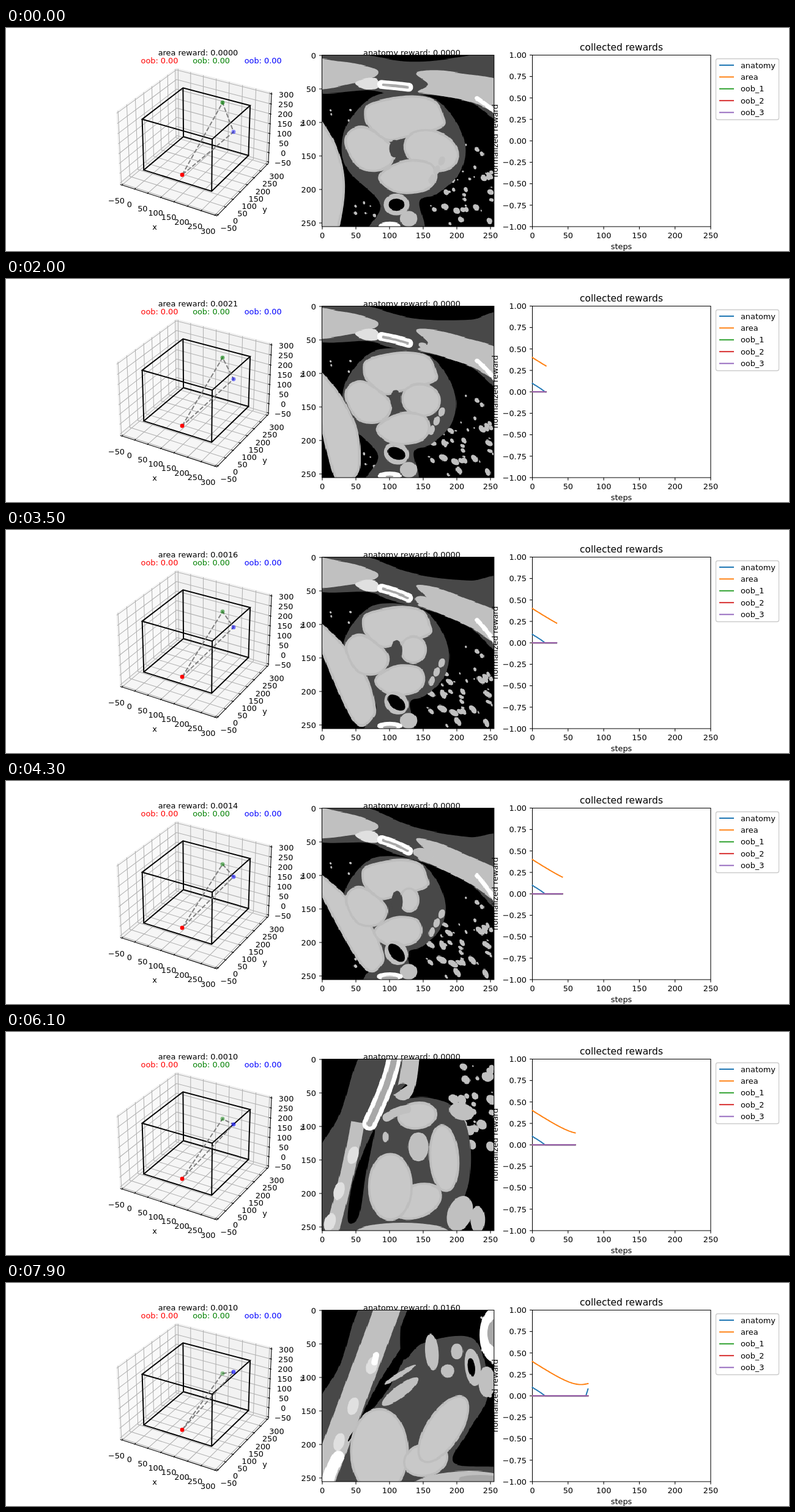
An HTML page with a canvas that plays this animation: 1280 by 366 pixels, repeating every 8 s.

```html
<!DOCTYPE html>
<html lang="en">
<head>
<meta charset="utf-8">
<title>Plane search</title>
<style>
html, body { margin: 0; width: 100%; height: 100%; overflow: hidden; background: #fff; }
canvas { position: absolute; left: 516.5px; top: 44.5px; width: 281.3px; height: 281.5px; image-rendering: pixelated; }
svg { position: absolute; left: 0; top: 0; font: 12.85px "DejaVu Sans", sans-serif; }
</style>
</head>
<body>
<canvas id="scan" width="256" height="256"></canvas>
<svg id="stage" width="1280" height="366">
  <clipPath id="aboveScan"><path d="M516 0h282v44.5h-282z"/></clipPath>
</svg>
<script>
const STEP_MS = 100, STEPS = 80;
const stage = document.getElementById('stage');
const ctx = document.getElementById('scan').getContext('2d');
const lerp = (a, b, t) => a + (b - a) * t;
const clamp = v => Math.min(1, Math.max(0, v));

function add(tag, attrs) {
  const node = document.createElementNS('http://www.w3.org/2000/svg', tag);
  for (const name in attrs) node.setAttribute(name, attrs[name]);
  return stage.appendChild(node);
}
function label(text, x, y, anchor = 'middle', attrs = {}) {
  const node = add('text', { x, y, 'text-anchor': anchor, ...attrs });
  node.textContent = text;
  return node;
}
const line = (d, stroke = '#000', width = 1.05, attrs = {}) =>
  add('path', { d, fill: 'none', stroke, 'stroke-width': width, ...attrs });
const signed = text => String(text).replace('-', '\u2212');
const pathOf = points => 'M' + points.map(p => p[0].toFixed(1) + ' ' + p[1].toFixed(1)).join('L');

// ---- 3D view: camera at elevation 30, azimuth -60, distance 10 ----
function project([x, y, z]) {
  const [a, b, c] = [x - 125, y - 125, (z - 125) * 0.75].map(v => v / 350 * 1.1428);
  const scale = 1522 / (10 - (0.433 * a - 0.75 * b + 0.5 * c));
  return [310 + scale * (0.866 * a + 0.5 * b), 181.5 - scale * (-0.25 * a + 0.433 * b + 0.866 * c)];
}
const space = (...points) => pathOf(points.map(project));

function drawSpace() {
  const LO = -57.3, HI = 307.3, S = 256;
  const pane = (fill, ...corners) => add('path', { d: space(...corners) + 'Z', fill, stroke: '#ececec' });
  pane('#f9f9f9', [LO, LO, LO], [LO, HI, LO], [LO, HI, HI], [LO, LO, HI]);
  pane('#f2f2f2', [LO, HI, LO], [HI, HI, LO], [HI, HI, HI], [LO, HI, HI]);
  pane('#f6f6f6', [LO, LO, LO], [HI, LO, LO], [HI, HI, LO], [LO, HI, LO]);
  const ticks = Array.from({ length: 8 }, (_, i) => i * 50 - 50);
  for (const v of ticks) {
    line(space([v, LO, LO], [v, HI, LO], [v, HI, HI]), '#b0b0b0');
    line(space([HI, v, LO], [LO, v, LO], [LO, v, HI]), '#b0b0b0');
    line(space([LO, LO, v], [LO, HI, v], [HI, HI, v]), '#b0b0b0');
  }
  line(space([LO, LO, LO], [HI, LO, LO], [HI, HI, LO], [HI, HI, HI]));
  ticks.forEach((v, i) => {
    line(space([v, LO - 3, LO], [v, LO + 6, LO]));
    line(space([HI - 6, v, LO], [HI + 3, v, LO]));
    line(space([HI - 6, HI, v], [HI + 3, HI, v]));
    label(signed(v), 180.5 + 21.4 * i, 287.5 + 6.5 * i + 0.1 * i * i);
    label(signed(v), 364 + 11.2 * i, 333 - 12.1 * i);
    label(signed(v), 452.5 + 0.8 * i, 225.5 - 15.6 * i - 0.05 * i * i);
  });
  label('x', 243, 331);
  label('y', 423, 302);
  label('z', 484, 161);
  const ring = [[0, 0], [S, 0], [S, S], [0, S]];
  const faces = [0, S].map(z => space(...ring.map(p => [...p, z])) + 'Z');
  const pillars = ring.map(p => space([...p, 0], [...p, S]));
  line([...faces, ...pillars].join(''), '#000', 1.95);
}

// ---- Scan slice, drawn in stage coordinates ----
const FAT = '#484848', MUSCLE = '#c0c0c0', BLOOD = '#c8c8c8', CARTILAGE = '#e0e0e0',
  BONE = '#fff', MARROW = '#a8a8a8', AIR = '#000';
const unmoved = p => p;
let seed;
const random = () => (seed = seed * 16807 % 2147483647) / 2147483647;

// Closed smooth outline through a few points.
function blob(fill, outline, warp = unmoved) {
  const points = outline.split(' ').map(pair => warp(pair.split(',').map(Number)));
  const at = i => points[(i + points.length) % points.length];
  ctx.beginPath();
  ctx.moveTo(...at(0));
  points.forEach((b, i) => {
    const a = at(i - 1), c = at(i + 1), d = at(i + 2);
    ctx.bezierCurveTo(b[0] + (c[0] - a[0]) / 6, b[1] + (c[1] - a[1]) / 6,
      c[0] - (d[0] - b[0]) / 6, c[1] - (d[1] - b[1]) / 6, ...c);
  });
  paint(fill);
}
function oval(fill, x, y, rx, ry, degrees = 0, size = 1) {
  if (size <= 0) return;
  ctx.beginPath();
  ctx.ellipse(x, y, rx * size, ry * size, degrees * Math.PI / 180, 0, 7);
  paint(fill);
}
function band(colour, width, x0, y0, bendX, bendY, x1, y1) {
  if (width <= 0) return;
  ctx.beginPath();
  ctx.moveTo(x0, y0);
  ctx.quadraticCurveTo(bendX, bendY, x1, y1);
  ctx.strokeStyle = colour;
  ctx.lineWidth = width;
  ctx.stroke();
}
function paint(fill) {
  ctx.fillStyle = fill;
  ctx.fill();
  if (fill !== BLOOD) return;
  ctx.strokeStyle = '#bebebe';
  ctx.lineWidth = 4;
  ctx.stroke();
}
function specks(count, x, y, w, h, size, stretch = 1) {
  for (let i = 0; i < count; i++) {
    const r = 1.5 + size * random() ** 2;
    oval(MUSCLE, x + w * random(), y + h * random(), r * stretch, r * 0.8, 20 + 50 * random());
  }
}

// Cross-section of the chest; u tilts the chest wall and squeezes the heart.
function drawChest(u) {
  const wall = ([x, y]) => [x, y + 0.3 * u * (x - 600) * (x > 600 ? 1 : 0.25)];
  const heart = ([x, y]) => [x - (x - 560) * 0.17 * u, y + (270 - y) * 0.11 * u];
  const lean = ([x, y]) => [x + u * Math.max(0, y - 150) * 0.42 , y - u * Math.max(0, y - 200) * 0.3];

  specks(34, 694 - 6 * u, 235, 108, 92, 5, 1 + 0.5 * u);
  specks(8, 750, 185, 50, 60, 3);
  specks(4, 525, 115, 40, 40, 1.5);
  specks(6, 570, 285, 35, 25, 2);

  blob(FAT, '500,30 590,44 650,54 700,53 760,44 815,30 815,150 760,122 700,110 630,108 590,102 500,102', wall);
  blob(FAT, '610,108 690,112 730,145 751,195 740,240 705,272 676,285 680,340 590,340 612,290 560,235 548,195 562,150', heart);
  blob(BLOOD, '500,155 528,175 545,215 552,255 548,300 535,340 500,345', lean);

  blob(MUSCLE, '500,53 545,54 580,60 607,69 602,80 570,90 500,99', wall);
  blob(MUSCLE, '670,74 700,69 745,74 815,90 815,140 760,121 700,109 673,105 690,92', wall);
  blob(CARTILAGE, '570,90 590,82 607,84 607,98 586,100', wall);
  oval(MUSCLE, 682, 100 + 19 * u, 17, 9, 15, u);
  const sternumEnd = wall([658, 97])[1];
  ctx.lineCap = 'round';
  band(BONE, 15, 614, 92 + 4 * u, 636, (91 + sternumEnd) / 2, 658, sternumEnd);
  band(MARROW, 4, 616, 93 + 4 * u, 636, (91 + sternumEnd) / 2, 656, sternumEnd);
  band(BONE, 7, 770, 115 + 40 * u, 788, 127 + 48 * u, 805, 142 + 62 * u);

  blob(BLOOD, '587,142 592,127 622,117 665,112 700,120 713,143 711,162 650,179 622,183 593,160', heart);
  blob(BLOOD, '555,190 564,168 590,164 632,196 629,222 605,234 575,226', heart);
  oval(BLOOD, 695 - 36 * u, 201 - 6 * u, 45 - 30 * u, 32 - 13 * u, 20 - 20 * u);
  blob(BLOOD, '610,245 630,227 660,217 694,223 703,245 689,264 655,271 627,264', heart);
  oval(FAT, 635 + 4 * u, 198, 9, 14 + 4 * u);

  oval(MUSCLE, 638, 290 - 8 * u, 21, 18, 50 * u);
  oval(AIR, 638, 290 - 8 * u, 13 + 5 * u, 10, 50 * u);
  oval(MUSCLE, 658, 313, 14, 13);
  oval(BONE, 627, 325 - 4 * u, 18 + 3 * u, 7);
  oval(MARROW, 627, 324, 14, 4, 0, u);
  for (let i = 0; i < 3; i++) oval(MUSCLE, 712 - 8 * i, 218 + 15 * i, 5, 8, 20);
}

// Long view along the heart; v sweeps it from ventricles over the arch to the outflow.
function drawLongView(v) {
  const early = clamp(1 - v / 0.55), late = clamp((v - 0.55) / 0.45), arch = 1 - early - late;
  const mix = (a, b, c) => a * early + b * arch + c * late;
  const bottom = 340 - 35 * clamp(v * 2), floor = 750 + 65 * clamp(v * 2);

  specks(32, 728 + 30 * clamp(v * 2), 55, 72, 150, mix(9, 2, 2));
  blob(FAT, `585,30 ${655 + 100 * arch},30 ${mix(672, 772, 645)},${mix(60, 80, 75)}
 ${mix(640, 775, 650)},${mix(105, 110, 125)} ${mix(690, 777, 685)},${mix(107, 135, 97)} ${mix(735, 772, 765)},${mix(125, 160, 92)}
 ${757 + 31 * v},${170 + 10 * v} ${mix(758, 752, 758)},240 ${mix(742, 738, 732)},295 ${floor},${bottom} ${floor},345 500,345 500,220 545,135`
    .replace(/\s+/g, ' '));

  // ribs, breastbone and the thin lung edge behind them
  ctx.lineCap = 'butt';
  band(MUSCLE, mix(28, 26, 0), 662, 40, 655, 110, mix(645, 612, 612), mix(95, 182, 182));
  band(MUSCLE, 22 + 20 * v, mix(575, 612, 628), mix(148, 38, 30), mix(560, 565, 582), mix(230, 150, 150), mix(530, 520, 512), 335);
  for (let i = -1; i < 3; i++) oval(CARTILAGE, 567 - 27 * i + 4 * i * i, 202 + 63 * i - 4 * i * i, 9, 15, 18);
  ctx.lineCap = 'round';
  const bone = [mix(634, 635, 605), mix(45, 60, 118), mix(626, 634, 604), mix(85, 78, 124), mix(594, 625, 602), mix(150, 95, 130)];
  band(BONE, mix(24, 26, 10), ...bone);
  band(MARROW, mix(10, 11, 0), ...bone);
  band(BONE, 20 * late, 543, 285, 530, 305, 522, 335);
  const tipX = mix(602, 632, 665), tipY = mix(160, 107, 82), endX = 558 + 7 * v, endY = mix(308, 274, 252);
  const middleX = (tipX + endX) / 2, middleY = (tipY + endY) / 2;
  blob(AIR, `${tipX},${tipY} ${middleX + mix(8, 3, 14)},${middleY} ${endX + mix(18, 3, 0)},${endY - 5}
 ${endX},${endY} ${middleX - mix(10, 6, 8)},${middleY}`.replace(/\s+/g, ' '));

  // great vessels
  oval(BLOOD, 672, 137, 31, 21, -8, early);
  band(MUSCLE, 14 * early, 622, 140, 640, 128, 655, 126);
  ctx.lineCap = 'butt';
  band(BLOOD, 28 * arch, 684, 203, 676, 100, 712, 99);
  ctx.lineCap = 'round';
  band(MUSCLE, 28 * arch, 716, 72, 748, 85, 762, 122);
  band(MUSCLE, 18 * arch, 695, 40, 705, 60, 714, 72);
  band(MUSCLE, 20 * arch, 735, 40, 738, 60, 742, 76);
  oval(MUSCLE, 677, 72, 10, 12, 0, arch);
  oval(MUSCLE, 748, 135, 9, 17, -30, arch);
  oval(MUSCLE, 696, 113, 11, 30, -5, late);
  oval(MUSCLE, 763, 138, 13, 31, -8, late);
  oval(AIR, 761, 138, 6, 15, -8, late);
  oval(MUSCLE, 786, 162, 14, 25, 0, late);
  oval(MUSCLE, 722, 144, 11, 11, 0, late);
  oval(MUSCLE, mix(674, 715, 737), mix(188, 137, 112), mix(17, 13, 10), mix(24, 14, 13));
  oval(MUSCLE, mix(620, 633, 644), mix(172, 182, 178), mix(5, 11, 10), mix(9, 30, 37), 45 * clamp(v * 2) + 8 * late);
  oval(MUSCLE, 644, 150, 4, 30, 58, late);
  oval(MUSCLE, 710, 273, 22, 7, -25, arch);

  // heart chambers
  oval(BLOOD, 671, 278, 42, 26, -22, early);
  oval(BLOOD, mix(628, 632, 610), mix(254, 273, 277), mix(35, 49, 46), mix(54, 69, 70));
  oval(BLOOD, 686, 290, 36, 26, -15, late);
  oval(BLOOD, mix(716, 719, 715), mix(207, 218, 240), mix(23, 27, 27), mix(54, 53, 62), mix(-4, 35, 33));

  // floor of the view
  oval(MUSCLE, 648, 330, 78, 17, 0, early);
  oval(MUSCLE, 742, 298, 20, 30, 20, early);
  oval(MUSCLE, 771, 308, 12, 22, 0, early);
  oval(MUSCLE, 740, 335, 85, 26, -4, 1 - early);
  oval(MARROW, 775, 322, 35, 7, 0, late);
  oval(MUSCLE, 745, 130, 21, 14, 15, early);
  oval(BONE, 801, 85, 27, 46, 0, late);
  oval(MARROW, 802, 82, 15, 24, 0, late);
}

function drawScan(step) {
  seed = 7;
  ctx.setTransform(1 / 1.1, 0, 0, 1 / 1.1, -516.5 / 1.1, -44.5 / 1.1);
  ctx.fillStyle = AIR;
  ctx.fillRect(516, 44, 283, 283);
  if (step < 52) drawChest(step / 43);
  else drawLongView(clamp((step - 61) / 18));
}

// ---- Reward chart ----
const chartX = v => 860.5 + v * 1.166, chartY = v => 185.2 - v * 140.8;
const areaAt = x => Math.sqrt(0.0174 + 3.08e-5 * (x - 68) ** 2);
const anatomyAt = x => x < 17.5 ? 0.098 * (1 - x / 17.5) ** 0.9 : Math.max(0, x - 75) * 0.08 / 3;
const series = [['anatomy', '#1f77b4', anatomyAt], ['area', '#ff7f0e', areaAt],
  ...['#2ca02c', '#d62728', '#9467bd'].map((colour, i) => ['oob_' + (i + 1), colour, () => 0])];

function drawScanAxes() {
  line('M516.5 44.5H797.8V326H516.5Z');
  for (let v = 0; v <= 250; v += 50) {
    const x = 517 + v * 1.1, y = 45 + v * 1.1;
    line(`M${x} 326v4.5M516.5 ${y}h-4.5`);
    label(v, x, 345);
    label(v, 507, y + 4.7, 'end');
  }
}
function drawChart() {
  line('M860.5 44.5H1152V326H860.5Z');
  for (let v = 0; v <= 250; v += 50) {
    line(`M${chartX(v)} 326v4.5`);
    label(v, chartX(v), 345);
  }
  for (let v = -1; v <= 1; v += 0.25) {
    line(`M860.5 ${chartY(v)}h-4.5`);
    label(signed(v.toFixed(2)), 851, chartY(v) + 4.7, 'end');
  }
  label('steps', 1006, 362.5);
  label('collected rewards', 1006, 36.5, 'middle', { 'font-size': 15.4 });
  label('normalized reward', 0, 0, 'middle', { transform: 'translate(804 185) rotate(-90)' });
  add('rect', { x: 1160.5, y: 50.5, width: 103, height: 100, rx: 3, fill: '#fff', stroke: '#ccc', 'stroke-width': 1.3 });
  series.forEach(([name, colour], i) => {
    const y = 61 + 19.4 * i;
    line(`M1166 ${y}h24`, colour, 1.95);
    label(name, 1201, y + 4.5, 'start');
  });
}

drawSpace();
const triangle = line('', '#7f7f7f', 1.95, { 'stroke-dasharray': '7.2 3.1' });
const [redDot, greenDot, blueDot] = ['red', 'green', 'blue'].map((fill, i) => {
  label('oob: 0.00', 251 + 84.6 * i, 58, 'middle', { fill });
  return add('circle', { r: 3.4, cx: [288, 354, 372][i], cy: 241, fill });
});
const areaText = label('', 314, 44.5);
const anatomyText = label('', 663.5, 44.5, 'middle', { 'clip-path': 'url(#aboveScan)' });
drawScanAxes();
drawChart();
const curves = series.map(([, colour]) => line('', colour, 1.95, { 'stroke-linecap': 'square' }));

function render(step) {
  const greenY = 122.5 + 0.328 * step, blueY = 170.5 - 0.31 * step;
  triangle.setAttribute('d', `M288 241L354 ${greenY}L372 ${blueY}Z`);
  greenDot.setAttribute('cy', greenY);
  blueDot.setAttribute('cy', blueY);
  greenDot.setAttribute('opacity', lerp(0.65, 0.4, step / STEPS));
  blueDot.setAttribute('opacity', lerp(0.45, 0.65, step / STEPS));

  const last = step - 1;
  const area = step ? areaAt(last) * 0.00705 : 0;
  const anatomy = step ? anatomyAt(last) * (last < 18 ? 0.1425 : 0.2) : 0;
  areaText.textContent = 'area reward: ' + area.toFixed(4);
  anatomyText.textContent = 'anatomy reward: ' + anatomy.toFixed(4);
  series.forEach(([, , value], i) => curves[i].setAttribute('d', step
    ? pathOf(Array.from({ length: step }, (_, x) => [chartX(x), chartY(value(x))])) : ''));
  drawScan(step);
}

let shownStep = -1;
function tick() {
  const step = Math.floor(performance.now() / STEP_MS) % STEPS;
  if (step !== shownStep) render(shownStep = step);
  requestAnimationFrame(tick);
}
tick();
</script>
</body>
</html>
```
